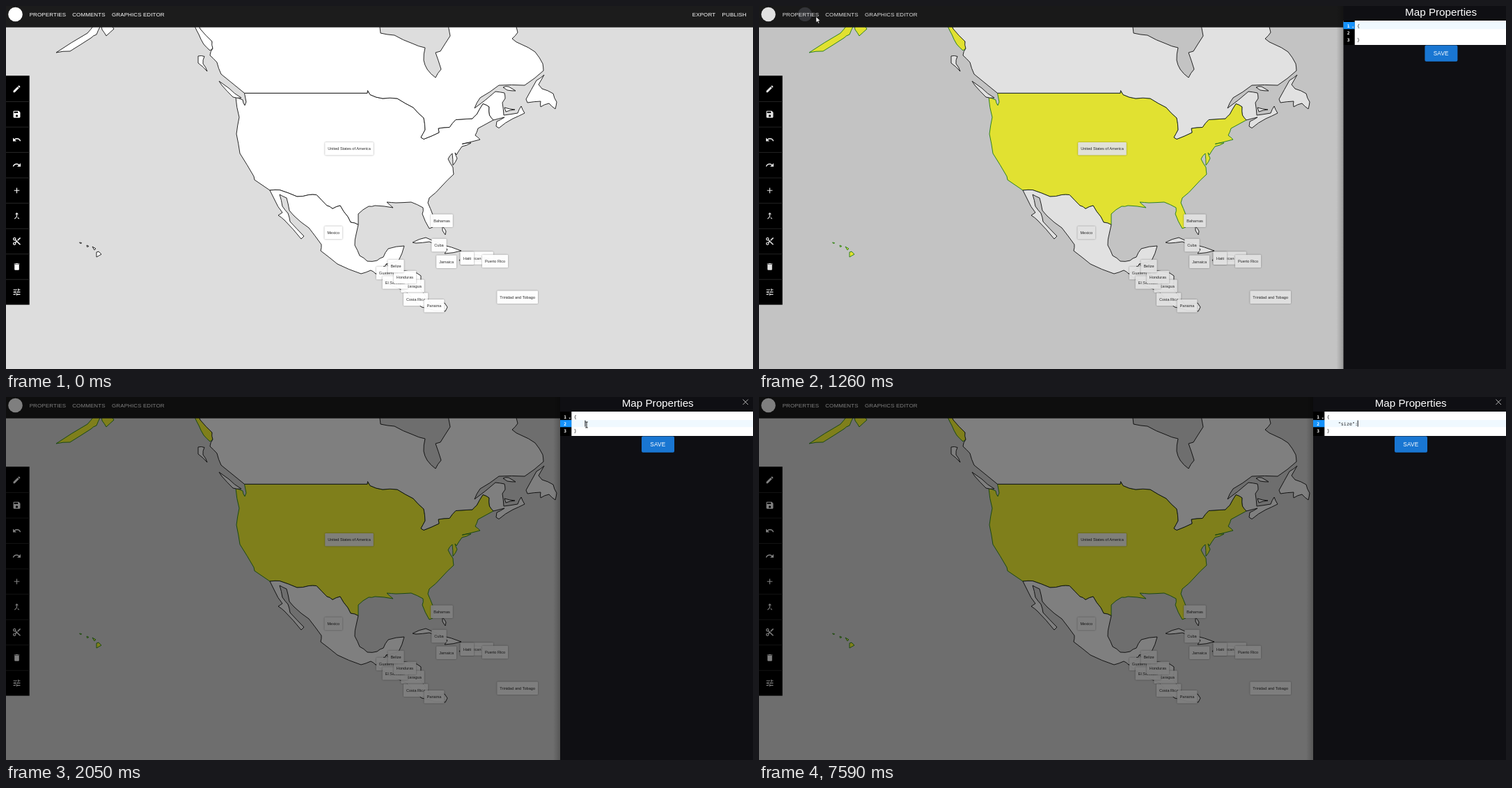
Animation, 1073 px wide and 522 px high, one loop 8 s. Source, as an HTML page:

```html
<!DOCTYPE html>
<html lang="en">
<head>
<meta charset="utf-8">
<title>Map editor</title>
<style>
  html, body { margin: 0; width: 100%; height: 100%; overflow: hidden; background: #ddd; }
  svg { display: block; width: 1073px; height: 522px; }
  text { font-family: "Liberation Sans", Arial, sans-serif; }
  .land { fill: #fff; stroke: #1d1d1d; stroke-width: .95; stroke-linejoin: round; }
  .painted { fill: #ffff37; stroke: #2d8f22; }
  .label rect { fill: #fff; opacity: .95; filter: drop-shadow(0 .8px .8px rgba(0, 0, 0, .4)); }
  .label text { font-size: 5.6px; fill: #2b2b2b; text-anchor: middle; }
  .menu text { font-size: 8px; letter-spacing: .1px; fill: #fff; }
  .code text { font: 6.7px "DejaVu Sans Mono", "Noto Sans Mono", monospace; fill: #222; }
  .gutter text { font: bold 6.2px "DejaVu Sans Mono", monospace; fill: #fff; text-anchor: middle; }
</style>
</head>
<body>
<svg viewBox="0 0 1073 522">
  <defs>
    <linearGradient id="shade">
      <stop offset="0" stop-opacity="0"/>
      <stop offset="1" stop-opacity=".22"/>
    </linearGradient>
    <clipPath id="button"><rect x="30" y="1" width="57" height="21" rx="2"/></clipPath>
  </defs>
  <rect width="1073" height="522" fill="#ddd"/>
  <g id="map"></g>
  <g id="labels"></g>

  <rect width="1073" height="30.7" fill="#1c1c1c"/>
  <circle cx="13.5" cy="12" r="10.3" fill="#fff"/>
  <g clip-path="url(#button)"><circle id="ripple" cx="66" cy="12" fill="#b9bcd0"/></g>
  <g class="menu">
    <text x="33.7" y="14.8">PROPERTIES</text>
    <text x="95.2" y="14.8">COMMENTS</text>
    <text x="152" y="14.8">GRAPHICS EDITOR</text>
    <text x="985.8" y="14.8">EXPORT</text>
    <text x="1028.6" y="14.8">PUBLISH</text>
  </g>
  <rect y="100.2" width="33.7" height="329.4" fill="#000"/>
  <g id="tools" fill="#fff"></g>

  <rect id="dim" width="1073" height="522"/>
  <g id="drawer">
    <rect x="786" width="10" height="522" fill="url(#shade)"/>
    <rect x="796" width="280" height="522" fill="#0f0f13"/>
    <text x="936.2" y="14.4" font-size="15.2" fill="#fff" text-anchor="middle">Map Properties</text>
    <path d="M1058.5 3.5l7.5 7.5m0-7.5l-7.5 7.5" stroke="#b5b5b5"/>
    <rect x="796" y="21" width="280" height="35" fill="#fff"/>
    <rect x="796" y="21" width="16.3" height="35" fill="#000"/>
    <g id="active">
      <rect x="812.3" y="23" width="264" height="10.2" fill="#f0f9ff"/>
      <rect x="796" y="23" width="16.3" height="10.2" fill="#1592fb"/>
    </g>
    <g class="gutter">
      <text x="803.2" y="30.5">1</text>
      <text x="803.2" y="40.6">2</text>
      <text x="803.2" y="50.7">3</text>
      <path d="M808.3 29.8h3l-1.5 2z" fill="#ccc"/>
    </g>
    <g class="code">
      <text x="815.7" y="30.6">{</text>
      <text id="typed" x="831.8" y="40.6"></text>
      <text x="815.7" y="50.8">}</text>
    </g>
    <rect id="caret" y="33.6" width=".9" height="9"/>
    <rect x="913" y="56.5" width="47" height="23.3" rx="2" fill="#1976d2"/>
    <text x="936.3" y="70.8" font-size="8.2" letter-spacing=".2" fill="#fff" text-anchor="middle">SAVE</text>
  </g>

  <g id="pointer">
    <path id="arrow" d="M0 0V8.6L2 6.8 3.4 10 4.8 9.4 3.4 6.4H6.1Z" fill="#fff" stroke="#000" stroke-width=".6"/>
    <path id="beam" d="M-1.8-4H1.8M0-4V4M-1.8 4H1.8" fill="none" stroke="#111" stroke-width=".9"/>
  </g>
</svg>
<script>
const $ = id => document.getElementById(id);

function add(parent, tag, attrs, text) {
  const el = document.createElementNS("http://www.w3.org/2000/svg", tag);
  for (const key in attrs) el.setAttribute(key, attrs[key]);
  if (text) el.textContent = text;
  return parent.appendChild(el);
}

let seed = 7;
const random = () => (seed = seed * 16807 % 2147483647) / 2147483647;

// Key points joined by a slightly ragged shoreline
function coast(keys) {
  const pts = keys.split(" ").map(p => p.split(",").map(Number));
  return pts.flatMap(([x, y], i) => {
    const [nx, ny] = pts[i + 1] || [x, y];
    const length = Math.hypot(nx - x, ny - y);
    if (length < 8) return [[x, y]];
    const k = (random() - .5) * 1.8 / length;
    return [[x, y], [(x + nx) / 2 + (ny - y) * k, (y + ny) / 2 - (nx - x) * k]];
  });
}

const land = (...arcs) => add($("map"), "polygon", { class: "land", points: arcs.flat().join(" ") });
const island = keys => land(coast(keys));

// Borders shared by neighbours, west to east
const parallel = [[342.5, 125.3], [519, 125.3]];
const lakes = coast("519.5,121.5 523,127.5 541,133 562,133 585,146 600,161 602,178 596,189 600,191.5 622,182 621,176 637,174.5 646,163.5 670,162 676,156 685,140.5 694,145 694.5,157 700,164");
const river = coast("379,265 393,264.5 418,274 435,271.5 446,271.5 461,287 469,291.5 480,287 491,303 495,311 506,314.5");

const states = [
  land(parallel, lakes,
    coast("678,176 674,186 681,192 655,198.5 668,197 655,202 647,214 645,211 648,219 642,229 641,212 635,220 642,232 643,242 626,259 608,276 606,283 613,300 613,318 608,320 598,299 599,290 582,282 560,283 547,282 556,290 530,287 521,288 506,299"),
    [...river].reverse(),
    coast("357,250 356,245 336,212 331,184 335,160 330,131 340,135 343,143 345,138")),
  island("271,29 277,41 284,55 293,64 297,61 296,51 279,33 275,20"),
  island("126,28 117,39 72,67 92,65 122,46 130,41 136,28"),
  island("137,28 138,34 144,43 155,33 151,27"),
  island("130,354 133,353 137,357 130,361"),
  island("105.5,340 108.5,340.5 107.5,342"),
  island("116,344 119,345.5 116.5,346.5"),
  island("124,346 129,349 127,351")
];

land(parallel, lakes,
  coast("716,160 705,166 704,173 708,175.5 728,162 745,154 740,144 735,154 715,157 713,139 717,133 716,125 703,123 673,147 681,132 708,114 745,114 772,93 771,83 760,66 740,55 727,47 735,38 731,20"),
  coast("635,20 638,43 624,65 617,67 625,91 617,103 605,91 600,78 602,60 584,54 558,42 538,39 535,20"),
  coast("275,20 279,33 296,51 297,61 293,71 303,81 309,98"));
island("773,99 762,107 747,134 749,139 768,137 768,145 780,140 789,148 791,138 786,126 770,119 765,113");
island("306,108 320,118 338,132 326,131 310,114");
island("276,72 285,72.5 283,83 289,94 276,82");
island("714,117 722,116 732,122 720,121");
island("716,146 731,149 718,152");

// The isthmus lies under the seam with its northern neighbour
island("531,385 552,401 575,411 597,433 616,438 631,439 634,433 630,427 612,430 594,405 596,388 590,384 558,379 546,371");
land(river, coast("503,328 501,344 508,359 519,367 533,366 542,361 549,349 572,345 564,366 546,371 545,374 542,374.5 546,376 531,385 524,380 510,385 476,371 452,352 453,343 435,319 414,302 407,294 403,276 393,271 397,288 405,298 408,310 428,331 424,335 400,308 391,301 397,297 386,279"));
island("584,340 603,333 625,343 654,352 630,356 634,350 608,339 589,341");
island("651,366 656,357 680,358 690,367");
island("627,317 632,324 631,329 627,323");

function label(name, x, y) {
  const g = add($("labels"), "g", { class: "label" });
  const text = add(g, "text", { x, y: y + 2 }, name);
  const width = text.getComputedTextLength() + 8;
  const box = add(g, "rect", { x: x - width / 2, y: y - 9.2, width, height: 18.4, rx: 1.2 });
  g.insertBefore(box, text);
}
label("United States of America", 493, 205.3);
label("Mexico", 470.3, 326);
label("Bahamas", 626, 308.7);
label("Cuba", 622, 344);
label("Jamaica", 632.6, 367.7);
label("Dominican Rep.", 676, 362.5);
label("Haiti", 662.5, 362.7);
label("Puerto Rico", 702.5, 367);
label("Guatemala", 549.5, 384);
label("Nicaragua", 584, 402.8);
label("El Salvador", 559, 397.5);
label("Honduras", 573, 390);
label("Belize", 560, 374);
label("Costa Rica", 588.6, 421.7);
label("Panama", 615, 431.2);
label("Trinidad and Tobago", 734.7, 418.8);

const icons = {
  edit: "M3 17.25V21h3.75L17.81 9.94l-3.75-3.75zM20.7 7q.6-.7 0-1.4l-2.3-2.3q-.7-.6-1.4 0l-1.9 1.8 3.8 3.8z",
  save: "M17 3H5a2 2 0 0 0-2 2v14a2 2 0 0 0 2 2h14a2 2 0 0 0 2-2V7zM12 19a3 3 0 1 1 0-6 3 3 0 0 1 0 6zM15 9H5V5h10z",
  undo: "M12.5 8Q8.6 8 5.6 10.6L2 7v9h9l-3.6-3.6q2.2-1.9 5.1-1.9 5.7.2 7.6 5.5l2.4-.8Q20 8.3 12.5 8z",
  redo: "M11.5 8q3.9 0 6.9 2.6L22 7v9h-9l3.6-3.6q-2.2-1.9-5.1-1.9-5.7.2-7.6 5.5l-2.4-.8Q4 8.3 11.5 8z",
  plus: "M19 13h-6v6h-2v-6H5v-2h6V5h2v6h6z",
  merge: "M17 20.4L18.4 19 15 15.6 13.6 17zM7.5 8H11v5.6L5.6 19 7 20.4l6-6V8h3.5L12 3.5z",
  cut: "M9.6 7.6A4 4 0 1 0 7.6 9.6L10 12l-2.4 2.4a4 4 0 1 0 2 2L12 14l7 7h3v-1zM6 8a2 2 0 1 1 0-4 2 2 0 0 1 0 4zM6 20a2 2 0 1 1 0-4 2 2 0 0 1 0 4zM19 3l-6 6 2 2 7-7V3z",
  bin: "M6 19a2 2 0 0 0 2 2h8a2 2 0 0 0 2-2V7H6zM19 4h-3.5l-1-1h-5l-1 1H5v2h14z",
  tune: "M3 17v2h6v-2zM3 5v2h10V5zM13 21v-2h8v-2h-8v-2h-2v6zM7 9v2H3v2h4v2h2V9zM21 13v-2H11v2zM15 9h2V7h4V5h-4V3h-2z"
};
Object.values(icons).forEach((d, i) => {
  const y = 119.2 + i * 36.52;
  add($("tools"), "path", { d, "fill-rule": "evenodd",
    transform: `translate(15.5 ${y}) scale(.55) translate(-12 -12)` });
  if (i) add($("tools"), "rect", { y: y - 18.6, width: 33.7, height: .9, fill: "#2c2c2c" });
});

const PAINT = 420, OPEN = 1230, FOCUS = 2050, LEAVE = 2590, BLINK = 532;
const ramp = (t, from, to) => Math.min(1, Math.max(0, (t - from) / (to - from)));
const smooth = u => u * u * (3 - 2 * u);
const easeOut = u => 1 - (1 - u) ** 2;
const show = (el, on) => el.setAttribute("visibility", on ? "visible" : "hidden");

// Each leg sets out from where the last one ended
const legs = [
  { start: 60, end: 250, x: 437, y: 176 },
  { start: PAINT, end: 1031, x: 78, y: 15 },
  { start: 1260, end: 1643, x: 834, y: 40 },
  { start: LEAVE, end: 2740, x: 998, y: 90 }
];
function pointerAt(t) {
  let x = 1012, y = 489;
  for (const leg of legs) {
    const k = easeOut(ramp(t, leg.start, leg.end));
    x += (leg.x - x) * k;
    y += (leg.y - y) * k;
  }
  return [x, y];
}

// Quotes open in pairs; "<" deletes backwards, ">" steps right
const keys = { 3860: '"', 5830: "s", 5910: "i", 6000: "z", 6200: "e", 6600: ":", 7090: "<", 7360: ">", 7590: ":" };
function editorAt(t) {
  let before = "", after = "", last = FOCUS;
  for (const [time, key] of Object.entries(keys)) {
    if (time > t) break;
    last = +time;
    if (key === "<") before = before.slice(0, -1);
    else if (key === ">") { before += after[0]; after = after.slice(1); }
    else before += key;
    if (key === '"') after = key + after;
  }
  const lit = t >= FOCUS && Math.floor((t - last) / BLINK) % 2 === 0;
  return { text: before + after, column: before.length, lit };
}

function draw(t) {
  states.forEach(s => s.classList.toggle("painted", t >= PAINT));

  const open = t >= OPEN;
  const left = 796 + 44 * Math.exp((1260 - t) / 74);
  show($("dim"), open);
  show($("drawer"), open);
  $("dim").setAttribute("opacity", .5 * smooth(ramp(t, 1204, 1385)));
  if (open) $("drawer").setAttribute("transform", `translate(${left - 796} 0)`);

  $("ripple").setAttribute("r", 34 * ramp(t, 1190, 1428));
  $("ripple").setAttribute("opacity", .2 * (1 - ramp(t, 1400, 1750)));

  $("active").setAttribute("transform", `translate(0 ${t >= FOCUS ? 10.1 : 0})`);
  const { text, column, lit } = editorAt(t);
  $("typed").textContent = text;
  $("caret").setAttribute("x", 831.5 + column * 4.033);
  $("caret").setAttribute("opacity", lit ? 1 : 0);

  const [x, y] = pointerAt(t);
  const shown = t >= 60 && t < LEAVE + 110;
  const overCode = open && x > left + 16 && y > 21 && y < 56;
  $("pointer").setAttribute("transform", `translate(${x} ${y})`);
  show($("arrow"), shown && !overCode);
  show($("beam"), shown && overCode);
}

function tick() {
  draw(performance.now() % 8000);
  requestAnimationFrame(tick);
}
tick();
</script>
</body>
</html>
```
